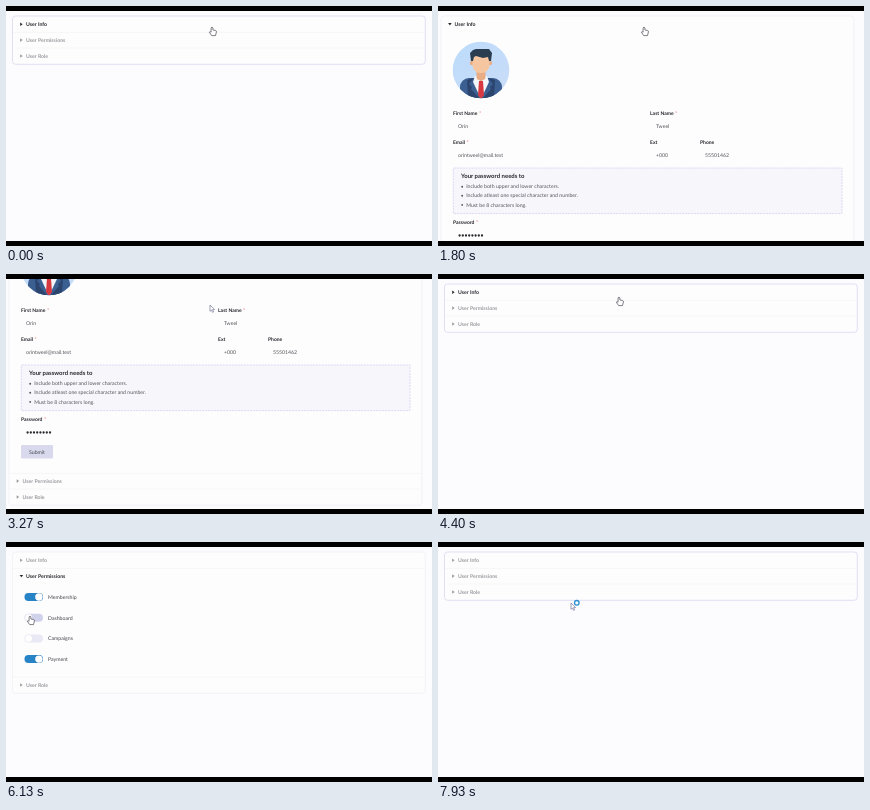
An HTML page with a canvas that plays this animation: 426x240 px, repeating every 8000 ms.

```html
<!DOCTYPE html>
<html lang="en">
<head>
<meta charset="utf-8">
<title>User form accordion</title>
<style>
html, body { margin: 0; width: 100%; height: 100%; overflow: hidden; background: #000; }
canvas { display: block; width: 426px; height: 240px; }
</style>
</head>
<body>
<canvas id="stage"></canvas>
<script>
const W = 426, H = 240, LOOP = 8000;
const canvas = document.getElementById('stage');
const ctx = canvas.getContext('2d');
const ratio = window.devicePixelRatio || 1;
canvas.width = W * ratio;
canvas.height = H * ratio;

const DARK = '#27272c', BODY = '#55555b', MUTED = '#9a9a9e', PAGE = '#fcfcfe';
const INFO_H = 244, PERM_H = 93;

// time, x, y of the pointer tip
const pointerPath = [
  [0, 206, 21], [2400, 206, 21], [2900, 206, 23], [3270, 204, 31],
  [3600, 200, 21], [3900, 190, 21], [4400, 181, 23], [4950, 70, 32],
  [5300, 64, 32], [5800, 27, 66], [6130, 24, 74], [6450, 24, 74],
  [6900, 80, 33], [7250, 100, 32], [7700, 130, 52], [7930, 133, 61], [8000, 133, 61]
];

const clamp = v => Math.max(0, Math.min(1, v));
const smooth = p => p * p * (3 - 2 * p);
const quint = p => p < .5 ? 16 * p ** 5 : 1 - (2 - 2 * p) ** 5 / 2;
const span = (t, start, length, ease = smooth) => ease(clamp((t - start) / length));

function pointerAt(t) {
  const i = Math.max(1, pointerPath.findIndex(k => k[0] >= t));
  const [t0, x0, y0] = pointerPath[i - 1], [t1, x1, y1] = pointerPath[i];
  const p = span(t, t0, t1 - t0);
  return { x: x0 + (x1 - x0) * p, y: y0 + (y1 - y0) * p };
}

function text(str, x, mid, color = BODY, size = 5.2, weight = 400) {
  ctx.font = `${weight} ${size}px Lato, sans-serif`;
  ctx.fillStyle = color;
  ctx.fillText(str, x, mid + size * .35);
  return ctx.measureText(str).width;
}

function box(x, y, w, h, r, fill, stroke, dash = []) {
  ctx.beginPath();
  ctx.roundRect(x, y, w, h, r);
  if (fill) { ctx.fillStyle = fill; ctx.fill(); }
  if (stroke) {
    ctx.setLineDash(dash);
    ctx.strokeStyle = stroke;
    ctx.lineWidth = .7;
    ctx.stroke();
    ctx.setLineDash([]);
  }
}

function disc(x, y, r, fill) {
  ctx.beginPath();
  ctx.arc(x, y, r, 0, Math.PI * 2);
  ctx.fillStyle = fill;
  ctx.fill();
}

function shape(fill, points) {
  ctx.beginPath();
  points.forEach(([x, y]) => ctx.lineTo(x, y));
  ctx.closePath();
  ctx.fillStyle = fill;
  ctx.fill();
}

function label(str, x, mid, required = true) {
  const w = text(str, x, mid, DARK, 5, 700);
  if (required) text('*', x + w + 1.5, mid - .5, '#e2574c', 5);
}

function avatar() {
  ctx.save();
  ctx.beginPath();
  ctx.arc(43, 64, 28.3, 0, Math.PI * 2);
  ctx.clip();
  const sky = ctx.createLinearGradient(20, 40, 66, 88);
  sky.addColorStop(0, '#bddcfb');
  sky.addColorStop(1, '#c9dcf8');
  ctx.fillStyle = sky;
  ctx.fillRect(14, 35, 58, 58);
  box(22, 72, 42, 26, 9, '#3c5f92');
  shape('#f2f5fa', [[37, 70], [49, 70], [51, 76], [43, 93], [35, 76]]);
  box(38.5, 62, 9, 12, 3, '#e9ad86');
  shape('#e9ad86', [[38.5, 71], [47.5, 71], [43, 76]]);
  shape('#d6393f', [[41, 75], [45, 75], [46, 89], [43, 93], [40, 89]]);
  shape('#2b456f', [[36, 72], [31, 78], [34, 81], [33, 83], [42, 93], [30, 93], [29, 74]]);
  shape('#2b456f', [[50, 72], [55, 78], [52, 81], [53, 83], [44, 93], [56, 93], [57, 74]]);
  disc(34, 57, 2.2, '#e9ad86');
  disc(52, 57, 2.2, '#e9ad86');
  box(34.5, 47, 17, 20, [4, 4, 8, 8], '#f6c6a0');
  shape('#2a3c50', [[33, 55], [32, 47], [35, 44], [38, 43], [51, 43], [54, 47], [53, 55],
    [51, 55], [50, 51], [45, 52], [38, 50], [36, 51], [35, 55]]);
  ctx.restore();
}

function infoForm() {
  avatar();
  label('First Name', 15, 107.5);
  label('Last Name', 212, 107.5);
  text('Orin', 20, 120.5);
  text('Tweel', 218, 120.5);
  label('Email', 15, 136.5);
  label('Ext', 212, 136.5, false);
  label('Phone', 262, 136.5, false);
  text('orintweel@mail.test', 20, 149.5);
  text('+000', 218, 149.5);
  text('55501462', 267, 149.5);

  box(15.3, 162, 388.7, 45.6, .5, '#f6f6fb', '#cfcbee', [2, 1]);
  text('Your password needs to', 23, 170, DARK, 6, 700);
  ['Include both upper and lower characters.',
    'Include atleast one special character and number.',
    'Must be 8 characters long.'].forEach((rule, i) => {
    const y = 180.5 + i * 9.1;
    disc(24.2, y + .2, .95, BODY);
    text(rule, 28.2, y);
  });

  label('Password', 15, 216.5);
  for (let i = 0; i < 8; i++) disc(21.6 + i * 3.2, 229.5, 1.15, '#29292e');
  box(15, 242, 32, 13.5, 1, '#d9d9ee');
  text('Submit', 23, 248.8, '#48484f');
}

function toggle(y, on, hover = false) {
  const x = 18.5;
  box(x, y - 4, 18.5, 8, 4, hover ? '#cfd2ea' : '#e9e8f5');
  if (on > 0) {
    ctx.globalAlpha = on;
    box(x, y - 4, 18.5, 8, 4, '#2583c6');
    ctx.globalAlpha = 1;
  }
  const knob = x + 4.1 + 10.3 * on;
  disc(knob, y, 3.7, '#dfe0ea');
  disc(knob, y, 3.4, '#fff');
}

function permissions(t) {
  const rows = ['Membership', 'Dashboard', 'Campaigns', 'Payment'];
  const dashboard = span(t, 6230, 200);
  rows.forEach((name, i) => {
    const y = 55 + i * 20.7;
    const on = i === 1 ? dashboard : i === 2 ? 0 : 1;
    toggle(y, on, i === 1 && t > 5950 && t < 6500);
    text(name, 42, y, '#45454b');
  });
}

function header(name, y, active, open) {
  const color = active ? DARK : MUTED;
  shape(color, open
    ? [[13.6, y - 1.2], [17.2, y - 1.2], [15.4, y + 1.2]]
    : [[14.2, y - 1.8], [16.6, y], [14.2, y + 1.8]]);
  text(name, 20, y, color, 5.2, 700);
}

function clipped(y, h, draw) {
  if (h <= 0) return;
  ctx.save();
  ctx.beginPath();
  ctx.rect(0, y, W, h);
  ctx.clip();
  draw();
  ctx.restore();
}

function divider(y) {
  ctx.fillStyle = '#f2f2f1';
  ctx.fillRect(7, y - .3, 412, .6);
}

function hand(x, y) {
  ctx.save();
  ctx.translate(x, y);
  ctx.beginPath();
  ctx.moveTo(-.9, 4.6);
  ctx.lineTo(-.9, .8);
  ctx.quadraticCurveTo(0, -.6, .9, .8);
  ctx.lineTo(.9, 3);
  ctx.lineTo(3.6, 3.5);
  ctx.quadraticCurveTo(4.6, 3.8, 4.4, 5);
  ctx.lineTo(3.5, 8.6);
  ctx.lineTo(-.3, 8.6);
  ctx.lineTo(-2.7, 5.2);
  ctx.quadraticCurveTo(-2, 4, -.9, 5.2);
  ctx.closePath();
  ctx.fillStyle = '#fff';
  ctx.fill();
  ctx.strokeStyle = '#55555f';
  ctx.lineWidth = .75;
  ctx.stroke();
  ctx.restore();
}

function arrow(x, y) {
  shape('#fff', [[0, 0], [0, 6.3], [1.5, 5], [2.6, 7.4], [3.6, 6.9], [2.6, 4.6], [4.6, 4.5]]
    .map(([a, b]) => [x + a, y + b]));
  ctx.strokeStyle = '#77779a';
  ctx.lineWidth = .7;
  ctx.stroke();
}

function busyRing(x, y) {
  ctx.beginPath();
  ctx.arc(x, y, 2.3, 0, Math.PI * 2);
  ctx.strokeStyle = '#2b8fd0';
  ctx.lineWidth = 1.3;
  ctx.stroke();
}

function draw(t) {
  const infoOpen = span(t, 700, 400, quint) - span(t, 3830, 400, quint);
  const permOpen = span(t, 5080, 400, quint) - span(t, 7180, 400, quint);
  const infoH = INFO_H * infoOpen, permH = PERM_H * permOpen;
  const bottom = 58.3 + infoH + permH;
  const scroll = 71 * (span(t, 2680, 400) - span(t, 3380, 280));
  const shift = bottom > 231 ? -3.5 : 0;
  const tip = pointerAt(t);
  const infoActive = t >= 700 && t < 3830, permActive = t >= 5080 && t < 7180;

  ctx.setTransform(ratio, 0, 0, ratio, 0, 0);
  ctx.textRendering = 'geometricPrecision';
  ctx.fillStyle = '#000';
  ctx.fillRect(0, 0, W, H);
  ctx.save();
  ctx.beginPath();
  ctx.rect(0, 5, W, 230);
  ctx.clip();
  ctx.fillStyle = PAGE;
  ctx.fillRect(0, 5, W, 230);
  ctx.translate(shift, -scroll);

  const tall = bottom > 70;
  box(6.5, 10, 412.8, bottom - 10, 3, '#fdfdfe', tall ? '#eeedf4' : '#d6d1ee');
  const rowY = [18.3, 34.1 + infoH, 50 + infoH + permH];
  const open = [infoActive, permActive, false];
  const pageY = tip.y + scroll;
  const over = rowY.map(y => Math.abs(pageY - y) < 7.9);
  divider(26.2 + infoH);
  divider(42 + infoH + permH);
  ['User Info', 'User Permissions', 'User Role'].forEach((name, i) =>
    header(name, rowY[i], open[i] || over[i], open[i]));

  clipped(26.2, infoH, () => {
    ctx.translate(3.5, 0);
    infoForm();
  });
  clipped(42 + infoH, permH, () => permissions(t));
  ctx.restore();

  const onToggle = permActive && tip.x < 38 && tip.y > 50;
  if (over.some(Boolean) || onToggle) hand(tip.x, tip.y);
  else arrow(tip.x, tip.y);
  if (t > 7800) busyRing(tip.x + 5.8, tip.y - .2);
}

function tick() {
  draw(performance.now() % LOOP);
  requestAnimationFrame(tick);
}
tick();
</script>
</body>
</html>
```
